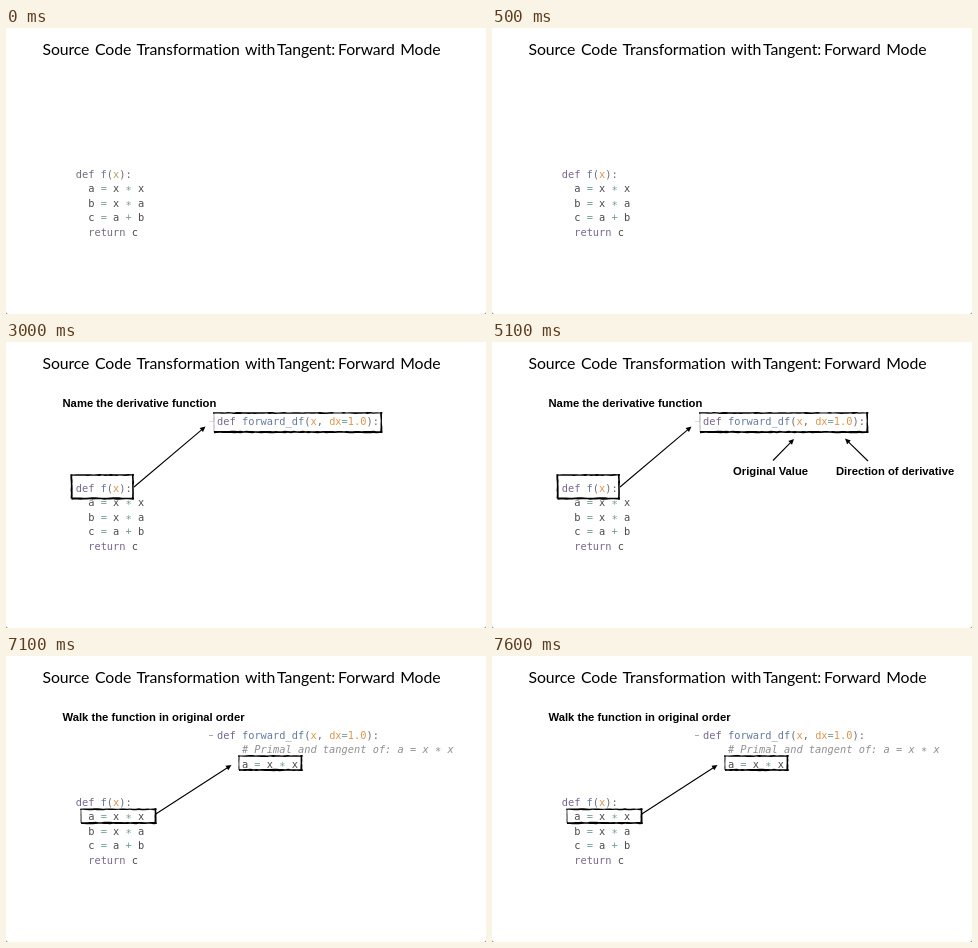
An HTML page that plays this animation: 480 px wide and 286 px high, repeating every 8 s.

```html
<!DOCTYPE html>
<html lang="en">
<head>
<meta charset="utf-8">
<title>Forward mode</title>
<style>
  html, body { margin: 0; width: 100%; height: 100%; overflow: hidden; background: #777; }
  svg { display: block; width: 480px; height: 286px; background: #fff; border-radius: 0 0 2.5px 2.5px; }
  text { white-space: pre; }
  .title { font: 15.8px Lato, "Open Sans", sans-serif; letter-spacing: -0.1px; }
  .label { font: bold 11.25px "Liberation Sans", Arial, sans-serif; }
  .code { font: 10.35px "DejaVu Sans Mono", monospace; fill: #48484c; }
  .signature { fill: #6c6c7c; }
  .key { fill: #77658f; }
  .fn { fill: #64799f; }
  .arg { fill: #dc964c; }
  .op { fill: #6f9f9f; }
  .note { fill: #8f8f92; font-style: italic; }
  .star { baseline-shift: -1.8px; }
  .pale { filter: saturate(0.6); }
  .pale .arg { fill: #bd9f3c; }
</style>
</head>
<body>
<svg id="stage" viewBox="0 0 480 286"></svg>
<script>
const stage = document.getElementById('stage');

let seed = 7;
const rnd = () => (seed = seed * 16807 % 2147483647) / 2147483647;

const label = (x, y, s) => `<text class="label" x="${x}" y="${y}">${s}</text>`;
const span = (cls, s) => `<tspan class="${cls}">${s}</tspan>`;

// One line of Python, coloured by token.
function code(x, y, line) {
  const isDef = line.startsWith('def'), isNote = line[0] === '#';
  let inArgs = false;
  const body = line.replace(/\w+(\.\d)?|[^\w]/g, s => {
    if (s === '(') inArgs = true;
    if (s === '*') return span(isNote ? 'star' : 'op star', s);
    if (isNote) return s;
    if (/^(def|return)$/.test(s)) return span('key', s);
    if (/[=+]/.test(s)) return span('op', s);
    if (isDef && /\w/.test(s)) return span(inArgs ? 'arg' : 'fn', s);
    return s;
  });
  const kind = isNote ? 'note' : isDef ? 'signature' : '';
  return `<text class="code ${kind}" x="${x}" y="${y}">${body}</text>`;
}

// A straight brush stroke with uneven edges.
function brush(x1, y1, x2, y2, w, opacity = 1) {
  const len = Math.hypot(x2 - x1, y2 - y1);
  const nx = (y1 - y2) / len, ny = (x2 - x1) / len;
  const n = Math.ceil(len / 3), near = [], far = [];
  for (let i = 0; i <= n; i++) {
    const x = x1 + (x2 - x1) * i / n, y = y1 + (y2 - y1) * i / n;
    const a = w * (0.35 + 0.3 * rnd()), b = w * (0.35 + 0.3 * rnd());
    near.push([x + nx * a, y + ny * a]);
    far.unshift([x - nx * b, y - ny * b]);
  }
  return `<polygon points="${near.concat(far).join(' ')}" opacity="${opacity}"/>`;
}

// Hand-drawn frame; the left side may be faint.
const box = (l, t, r, b, leftWidth, leftOpacity) =>
  brush(l - 1, t, r + 1, t, 1.5) +
  brush(r, t - 1, r, b + 1, 1.7) +
  brush(l, b, r + 1, b, 1.9) +
  brush(l, t, l, b, leftWidth, leftOpacity);

function arrow(x1, y1, x2, y2) {
  const deg = Math.atan2(y2 - y1, x2 - x1) * 180 / Math.PI;
  const len = Math.hypot(x2 - x1, y2 - y1);
  return `<g transform="translate(${x2} ${y2}) rotate(${deg})">
    <path d="M${-len} 0H-4" stroke="#000" stroke-width="1.1"/>
    <path d="M0 0L-5.5 -2.6V2.6Z"/></g>`;
}

const group = (id, content) => `<g id="${id}">${content}</g>`;

const title = 'Source Code Transformation with Tangent: Forward Mode'.split(' ');
const titleX = [36.5, 89, 130.5, 239, 271, 332, 394.3];
const lines = ['a = x * x', 'b = x * a', 'c = a + b', 'return c'];
const signature = code(211, 82.7, 'def forward_df(x, dx=1.0):');
const foldMark = opacity => `<path d="M203 79.5h4" stroke="#aaa" opacity="${opacity}"/>`;

stage.innerHTML =
  title.map((w, i) => `<text class="title" x="${titleX[i]}" y="27">${w}</text>`).join('') +
  group('program',
    lines.map((s, i) => code(82.2, 164.1 + 14.5 * i, s)).join('') +
    '<rect id="mask" x="63" y="131" width="66" height="27.5" fill="#fff"/>' +
    code(69.7, 149.6, 'def f(x):')) +
  group('naming',
    label(56.5, 64.6, 'Name the derivative function') +
    foldMark(0.4) + signature +
    box(65.5, 133, 127, 156.5, 1.8, 1) +
    box(208, 71, 375.3, 90, 1, 0.35) +
    arrow(128, 145, 199.5, 84.5)) +
  group('params',
    label(241, 133, 'Original Value') + label(344, 133, 'Direction of derivative') +
    arrow(281, 118.5, 302, 97) + arrow(376, 119, 353, 96.5)) +
  group('walking',
    label(56.5, 64.6, 'Walk the function in original order') +
    foldMark(1) + signature +
    code(235.9, 97.2, '# Primal and tangent of: a = x * x') +
    code(235.9, 111.7, 'a = x * x') +
    box(75, 153.3, 149.5, 167, 1.2, 0.75) +
    box(233, 100, 295.5, 114, 1.2, 0.75) +
    arrow(149, 158.5, 225.5, 109));

const part = Object.fromEntries(
  ['program', 'mask', 'naming', 'params', 'walking'].map(id => [id, document.getElementById(id)]));
const show = (el, on) => el.style.display = on ? '' : 'none';

function draw(now) {
  const t = now % 8000;
  const naming = t >= 2900 && t < 7100;
  show(part.mask, naming);
  show(part.naming, naming);
  show(part.params, t >= 5100 && t < 7100);
  show(part.walking, t >= 7100);
  part.program.classList.toggle('pale', t < 200);
}

const start = performance.now();
function tick() {
  draw(performance.now() - start);
  requestAnimationFrame(tick);
}
tick();
</script>
</body>
</html>
```
